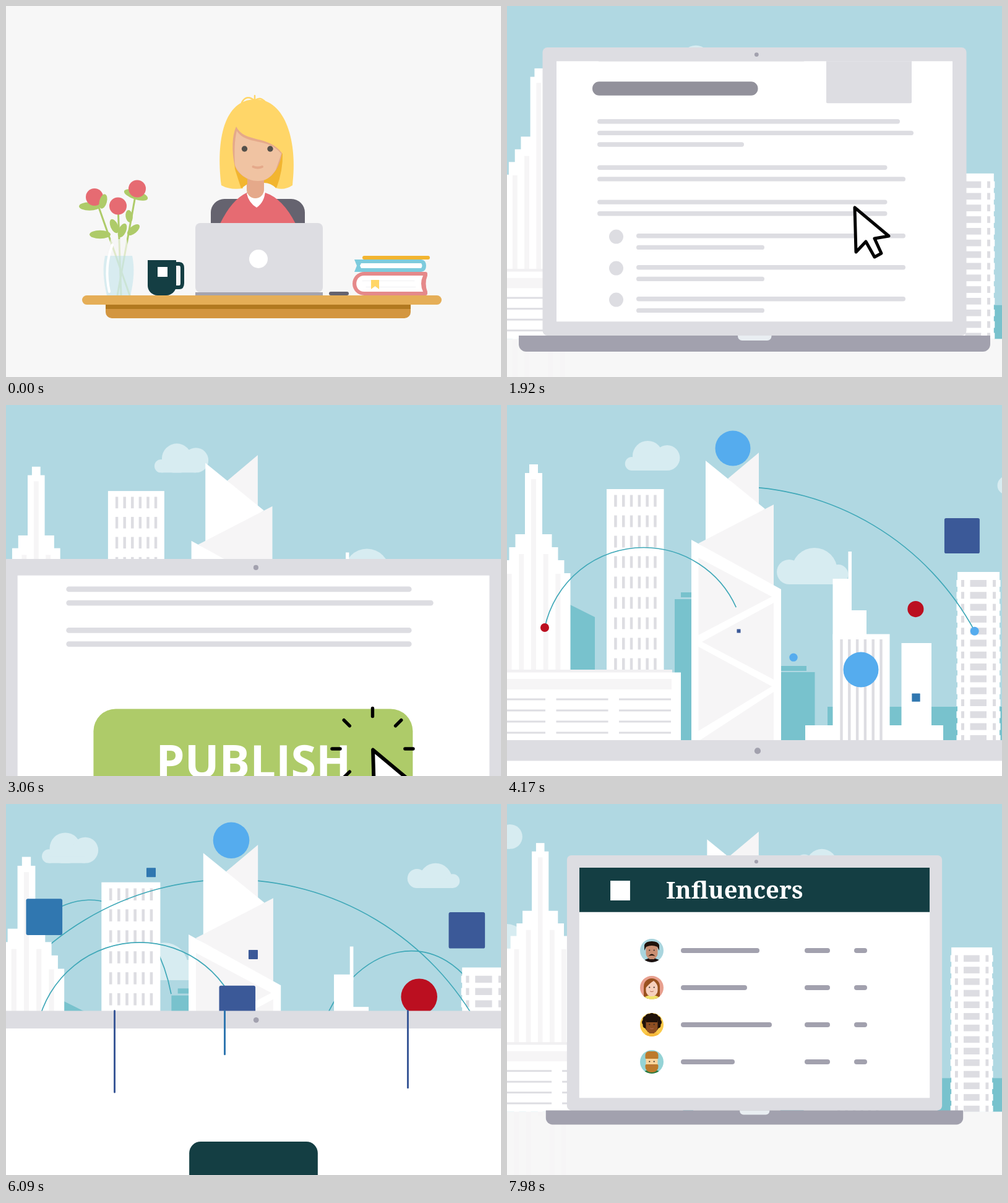
An HTML page with a canvas that plays this animation: 800x600 px, repeating every 8 s.

```html
<!DOCTYPE html>
<html lang="en">
<head>
<meta charset="utf-8">
<title>Publishing</title>
<style>
  html, body { margin: 0; width: 100%; height: 100%; overflow: hidden; background: #f7f7f7; }
  canvas { display: block; width: 100vw; height: 100vh; }
</style>
</head>
<body>
<canvas id="stage" width="800" height="600"></canvas>
<script>
const ctx = document.getElementById('stage').getContext('2d');
const LOOP = 8000;
const SKY = '#b0d8e2', CLOUD = '#d7ecf1', PAPER = '#f7f7f7', GREY = '#dddde2', SHADE = '#f6f5f6';
const TEAL = '#78c2cd', DARK = '#143e43', SLATE = '#a2a1ae', RED = '#e66b72', LEAF = '#aecb69';
const SKIN = '#f0c3a2', SKIN_SHADE = '#e5a98a', HAIR = '#ffd668', HAIR_SHADE = '#f2b530', EYE = '#54504a';
const NAVY = '#3b5998', BLUE = '#3077b0', AZURE = '#55acee', CRIMSON = '#bb0f20';

// ---- timing ----
const mix = (a, b, k) => a + (b - a) * k;
const prog = (t, a, b) => Math.min(1, Math.max(0, (t - a) / (b - a)));
const smooth = k => k * k * (3 - 2 * k);
const inOut = (k, n) => k < .5 ? (2 * k) ** n / 2 : 1 - (2 - 2 * k) ** n / 2;
const easeOut = k => 1 - (1 - k) ** 3;

// ---- drawing ----
function rect(x, y, w, h, color) { ctx.fillStyle = color; ctx.fillRect(x, y, w, h); }
function box(x1, y1, x2, y2, color) { rect(x1, y1, x2 - x1, y2 - y1, color); }
function round(x1, y1, x2, y2, r, color) {
  ctx.beginPath();
  ctx.roundRect(x1, y1, x2 - x1, y2 - y1, r);
  ctx.fillStyle = color;
  ctx.fill();
}
function oval(x, y, rx, ry, color, deg = 0) {
  ctx.beginPath();
  ctx.ellipse(x, y, rx, ry, deg * Math.PI / 180, 0, 7);
  ctx.fillStyle = color;
  ctx.fill();
}
const disc = (x, y, r, color) => oval(x, y, r, r, color);
function shape(d, color) { ctx.fillStyle = color; ctx.fill(new Path2D(d)); }
function line(d, color, width, cap = 'round') {
  ctx.strokeStyle = color;
  ctx.lineWidth = width;
  ctx.lineCap = cap;
  ctx.lineJoin = 'round';
  ctx.stroke(new Path2D(d));
}
function layer(draw) { ctx.save(); draw(); ctx.restore(); }
function clip(x, y, w, h) { ctx.beginPath(); ctx.rect(x, y, w, h); ctx.clip(); }
// scales about the point (x, y) and moves that point to (toX, toY)
function place(x, y, toX, toY, scale) {
  ctx.translate(toX, toY);
  ctx.scale(scale, scale);
  ctx.translate(-x, -y);
}
function text(str, x, y, font, align) {
  ctx.font = font;
  ctx.textAlign = align;
  ctx.fillStyle = '#fff';
  ctx.fillText(str, x, y);
}

// ---- desk ----
function flower(x, y, root) {
  line(`M${x + (root - x) * .1} ${y + 13}L${root} 468`, LEAF, 3, 'butt');
  disc(x, y, 14, RED);
}
const leaf = (x, y, length, deg) => oval(x, y, length, 4 + length / 6, LEAF, deg);

function flowers() {
  leaf(135, 324, 17, 0);
  leaf(152, 369.5, 17, 0);
  leaf(210, 305.5, 20, 18);
  leaf(199, 340, 10, 82);
  leaf(206, 362, 12, -40);
  for (const side of [-1, 1]) leaf(181.5 + 6.5 * side, 359.5 + 3.5 * side, 12, 90 + 24 * side);
  flower(143, 309, 200);
  flower(181, 323.5, 186);
  flower(212, 295.5, 180);
  leaf(157, 316, 12, 105);
  shape('M169 377H195Q198 395 204 404H160Q167 392 169 377Z', '#f7f7f7b0');
  shape('M160 404H204Q210 432 201 468H163Q154 432 160 404Z', '#d2eaf0d0');
  line('M172 386Q158 422 167 462', '#fff', 4);
}

function mug() {
  line('M270 417H280Q285 417 285 424V448Q285 455 280 455H270', DARK, 6);
  round(229, 411, 275, 468, [0, 0, 16, 16], DARK);
  rect(245, 422, 16, 16, '#fff');
}

function books() {
  round(576, 404, 685, 410, 3, HAIR_SHADE);
  shape('M563 410H671Q679 411 679 420Q679 429 671 430H563L567 420Z', '#7dcbdd');
  shape('M574 416H671Q674 420 671 424H574L572 420Z', '#fff');
  round(560, 430, 681, 468, [19, 3, 3, 19], '#e5898a');
  shape('M579 436H674Q668 449 674 462H579C562 462 562 436 579 436Z', '#fff');
  shape('M681 436Q676 449 681 462Z', PAPER);
  line('M576 444.5H660M582 454.5H662', '#f1f1f3', 1);
  shape('M590 443H603V458L596.5 453L590 458Z', HAIR);
}

function head() {
  round(389, 262, 417, 311, 14, SKIN_SHADE);
  shape('M348 290C339 215 353 152 402 151C452 150 472 220 463 290Q451 298 438 295L425 255H385L383 295Q362 298 348 290Z', HAIR);
  shape('M368 240L370 264L380 295L390 288V265ZM447 238Q448 265 437 295Q428 286 417 286V265Z', HAIR_SHADE);
  shape('M372 195C385 222 425 208 446 238C441 268 425 283 407 283C386 283 371 267 369 255C365 235 365 210 372 195Z', SKIN_SHADE);
  shape('M373 202C388 226 424 212 445 239L436 265C427 279 418 283 407 283C389 283 374 270 370 257C369 235 369 218 373 202Z', SKIN);
  line('M381 156Q389 142 402 153Q410 146 418 154M402 145V155', HAIR, 2.5);
  for (const x of [385.5, 427]) disc(x, 231, 4.7, EYE);
  line('M399.5 260Q407 263 414 260', SKIN_SHADE, 4);
}

function desk(t) {
  round(331, 312, 483, 380, 22, '#65636f');
  shape('M346 352Q365 313 389 302H419Q447 311 468 352Z', RED);
  shape('M389 303Q392 318 405 326Q418 317 419 299Z', '#fff');
  layer(() => {
    ctx.translate(403, 308);
    ctx.rotate(-.06 * Math.sin(Math.PI * prog(t, 30, 810)));
    ctx.translate(-403, -308);
    head();
  });
  round(306, 351, 512, 463, 8, GREY);
  box(306, 463, 512, 468, '#a5a4ae');
  disc(408, 409, 15, '#fff');
  flowers();
  mug();
  round(522, 462, 554, 468, 3, '#65636f');
  books();
  round(161, 483, 654, 505, [0, 0, 10, 10], '#d39640');
  box(161, 483, 654, 490, '#b27920');
  round(123, 468, 704, 483, 7.5, '#e5ae57');
}

// ---- city ----
function cloud(x, bottom, rise, left, main, right) {
  const from = x - .78 * main - .6 * left, to = x + .78 * main + .6 * right;
  layer(() => {
    clip(x - 150, 0, 300, bottom);
    disc(from, bottom - left, left, CLOUD);
    disc(x, bottom - rise, main, CLOUD);
    disc(to, bottom - right, right, CLOUD);
    box(from, bottom - Math.min(left, right), to, bottom, CLOUD);
  });
}

// Clouds speed up until 6.09 s, then drift evenly; nearer ones move faster.
function clouds(t) {
  const s = t / 1000 - 1.92, curved = Math.min(s, 4.17);
  const drift = 17 * curved + 7.36 * curved ** 2 + 75.5 * (s - curved);
  cloud(303 - drift, 106, 23.5, 11, 24.5, 20.5);
  cloud(642 - 1.92 * drift, 290, 22, 20, 37, 16);
  cloud(929 - 1.22 * drift, 145, 13, 15, 26, 11);
}

function leftTower() {
  const tier = (half, top) => box(43 - half, top, 43 + half, 430, '#fff');
  tier(7, 96);
  tier(14, 110);
  for (let i = 0; i < 4; i++) tier(29.5 + 10 * i, 209 + 21 * i);
  for (let i = -2; i <= 2; i++) rect(39 + 19.7 * i, i ? 209 + 32 * Math.abs(i) : 120, 8, 430, SHADE);
  box(-40, 428, 267, 433, '#f1f0f2');
  box(-40, 432.5, 281, 544, '#fff');
  box(-40, 443, 266, 460, SHADE);
  for (let y = 474.5; y < 540; y += 18)
    for (let x = -22; x < 200; x += 101.5) rect(x, y, 84, 3, GREY);
}

function windowBlock() {
  box(161, 136, 253.5, 432, '#fff');
  for (let y = 145.5; y < 420; y += 33)
    for (let i = 0; i < 6; i++) rect(173.2 + 12.8 * i, y, 4.5, 19, GREY);
}

function crystal() {
  shape('M357 119L407 77V170Z', SHADE);
  shape('M321 90L417 168L321 240Z', '#fff');
  shape('M309 224L431 161V300Z', SHADE);
  shape('M298 218L443 298V544H298Z', '#fff');
  shape('M309.5 247L428 310L309.5 372ZM431 320V444L315 383ZM309.5 391L428 455L309.5 527ZM431 464V544H309Z', SHADE);
}

function spireTower() {
  box(551.5, 237, 557, 290, '#fff');
  box(526.5, 281, 557, 380, '#fff');
  box(550, 332, 581, 380, '#fff');
  box(526.5, 370.5, 618.5, 544, '#fff');
  box(482, 518, 705, 544, '#fff');
  box(637.5, 385, 686, 544, '#fff');
  for (let i = 0; i < 6; i++) rect(538.3 + 12.8 * i, 379, 4.4, 165, GREY);
}

function rightTower() {
  box(728, 270, 796, 544, '#fff');
  for (let y = 283; y < 540; y += 19.3) {
    const h = Math.min(11, 544 - y);
    rect(726.5, y, 71, h, '#fff');
    rect(748.5, y, 26.5, h, GREY);
    for (const side of [-1, 1]) rect(759.5 + 25.5 * side, y, 5, h, GREY);
  }
}

function backBlocks() {
  shape('M102 323L142 343V432H102Z', TEAL);
  box(281, 303, 300, 311, TEAL);
  box(271, 314, 300, 544, TEAL);
  box(440, 422, 484, 430, TEAL);
  box(440, 432, 497.5, 544, TEAL);
  box(518, 488, 860, 544, TEAL);
  box(-100, 544, 900, 800, PAPER);
}

const fadeOut = t => 1 - smooth(prog(t, 6250, 6400));

function arc(t, d, length, start, end) {
  const k = prog(t, start, end) * fadeOut(t);
  if (!k) return;
  layer(() => {
    ctx.setLineDash([length * k, length * 2]);
    line(d, '#3fa8b8', 1.6, 'butt');
  });
}

// A badge grows while rising to its place.
function badge(t, start, color, x, y) {
  const grow = easeOut(prog(t, start, start + 330));
  const half = 28.5 * grow * fadeOut(t), cy = y + 48 * (1 - grow) ** 2;
  if (half < .3) return;
  if (color === AZURE || color === CRIMSON) disc(x, cy, half, color);
  else round(x - half, cy - half, x + half, cy + half, half * .1, color);
}

function badges(t) {
  const dot = 7 * prog(t, 3580, 3700) * fadeOut(t);
  disc(61, 360, dot, CRIMSON);
  disc(755.7, 365.7, dot, AZURE);
  badge(t, 3700, AZURE, 365, 70);
  badge(t, 3750, NAVY, 735.4, 211.5);
  badge(t, 3800, AZURE, 572, 428);
  badge(t, 4110, CRIMSON, 660.4, 316);
  badge(t, 4143, BLUE, 661, 445);
  badge(t, 4143, AZURE, 463, 380);
  badge(t, 4159, NAVY, 374.5, 327);
  badge(t, 4700, BLUE, 71, 190.5);
  badge(t, 6060, BLUE, 239, 94);
  badge(t, 6060, NAVY, 399.5, 223);
}

function city(t) {
  const zoom = .0146 * (Math.min(6360, Math.max(2580, t)) - 4170) / 1000;
  const drop = smooth(prog(t, 6360, 6850));
  const scale = mix(1 + zoom, .9825, drop) - .0125 * prog(t, 6850, 7980);
  const dy = mix(-380 * zoom - 3200 * zoom ** 2, -30, drop);
  rect(0, 0, 800, 600, SKY);
  layer(() => {
    place(400, 0, 400, dy, scale);
    clouds(t);
    backBlocks();
    arc(t, 'M70 190C170 120 250 200 271 314', 290, 4650, 5200);
    arc(t, 'M505 373C550 230 700 190 765 335', 380, 4750, 5350);
    windowBlock();
    rightTower();
    arc(t, 'M756 366A445 445 0 0 0 -28 366', 959, 3650, 4640);
    leftTower();
    crystal();
    spireTower();
    arc(t, 'M61 360A163.6 163.6 0 0 1 381 360', 445, 3650, 4215);
    badges(t);
  });
}

// ---- screen contents ----
const bar = (x1, x2, y) => round(x1, y - 3.7, x2, y + 3.7, 3.7, GREY);
const paragraph = (x, y, ...ends) => ends.forEach((end, i) => bar(x, end, y + 18.6 * i));

function article() {
  paragraph(146, 49.5, 482, 450, 482);
  round(516, 19, 654, 158, 2, GREY);
  round(138, 123, 405.5, 145.5, 11, '#92919b');
  paragraph(146, 187.5, 635, 657, 383);
  for (const y of [262, 529]) {
    paragraph(146, y, 614.5, 644);
    paragraph(146, y + 55.8, 614.5, 614.5);
  }
  for (let y = 372.5; y < 490; y += 51) {
    disc(176.5, y + 1.2, 11.5, GREY);
    paragraph(209, y, 644, 416);
  }
  round(183, 691.5, 616, 834, 30, LEAF);
  text('PUBLISH', 400, 785, 'bold 62px "Open Sans", "Noto Sans", sans-serif', 'center');
}

function pointer(t) {
  const outline = 'M562 326L564 398L580 381L594 406L605 400L594 376L617 372Z';
  shape(outline, '#fff');
  line(outline, '#000', 5);
  if (t < 2960 || t > 3240) return;
  const burst = easeOut(prog(t, 2960, 3060)), near = mix(32, 44, burst), far = mix(36, 55, burst);
  // rays all round, leaving a gap where the pointer's body is
  for (let i = 2; i <= 8; i++) {
    const c = Math.cos(i * Math.PI / 4), s = Math.sin(i * Math.PI / 4);
    line(`M${561.5 + c * near} ${324.5 + s * near}L${561.5 + c * far} ${324.5 + s * far}`, '#000', 4.5);
  }
}

function page(t) {
  layer(() => {
    ctx.translate(0, -mix(-130, 421, inOut(prog(t, 1640, 2456), 2)));
    article();
  });
  pointer(t);
}

const PEOPLE = [
  { back: '#a9d5de', hair: '#20120a', skin: '#c98f72', top: '#1d1210', width: 127 },
  { back: '#e8a08f', hair: '#99511f', skin: '#f6d0bd', top: '#f1e26b', width: 107 },
  { back: '#fbca4a', hair: '#20120a', skin: '#8e4f22', top: '#f6b93b', width: 147 },
  { back: '#94d3d6', hair: '#bd7a2b', skin: '#f9d49c', top: '#2b7a3f', width: 87 }
];
const HAIR_BEHIND = [
  () => {},
  hair => round(-13, -15, 13, 18, [13, 13, 4, 4], hair),
  hair => {
    for (let a = 0; a < 6.2; a += Math.PI / 6) disc(11 * Math.cos(a), -4 + 10 * Math.sin(a), 5, hair);
  },
  () => {}
];
const HAIR_FRONT = [
  hair => shape('M-12 0V-9Q-10 -15 0 -15Q10 -15 12 -9V0L9 -6Q0 -10 -9 -6ZM-5.5 9Q0 2 5.5 9Q0 7 -5.5 9Z', hair),
  hair => shape('M-11 2Q-11 -14 2 -14Q11 -13 11 2Q8 -8 3 -11Q-4 -7 -11 2Z', hair),
  hair => box(-9, -11, 9, -4, hair),
  hair => {
    round(-10.5, -17, 10.5, -5, [6, 6, 1, 1], hair);
    round(-10.5, 4, 10.5, 17, [2, 2, 9, 9], hair);
  }
];

function person({ back, hair, skin, top }, i) {
  ctx.beginPath();
  ctx.arc(0, 0, 19, 0, 7);
  ctx.clip();
  rect(-19, -19, 38, 38, back);
  HAIR_BEHIND[i](hair);
  oval(0, 21, 15, 9, top);
  box(-4, 6, 4, 14, skin);
  round(-9.5, -11, 9.5, 14, [6, 6, 9, 9], skin);
  HAIR_FRONT[i](hair);
  for (const x of [-3.7, 3.7]) disc(x, -.5, 1.1, '#332a26');
  if (i) line('M-2.5 6Q0 7.5 2.5 6', '#b76b55', 1);
}

function row(who, i) {
  const y = 237 + 60 * i, pill = (x, w) => round(x, y - 4, x + w, y + 4, 4, SLATE);
  layer(() => {
    ctx.translate(234, y);
    person(who, i);
  });
  pill(281, who.width);
  pill(481, 41);
  pill(561, 21);
}

function panel(t) {
  const grow = smooth(prog(t, 5915, 6235)), open = smooth(prog(t, 7020, 7380));
  if (!grow) return;
  const w = mix(282 * grow, 640, open), h = mix(142 * grow, 81.4, open);
  const x = 400 - w / 2, y = mix(mix(282, 266, grow), 130, open) - h / 2;
  round(x, y, x + w, y + h, Math.min(14.5 * (1 - open), h / 2), DARK);
  const size = mix(51, 36, open) * smooth(prog(t, 6300, 6500));
  rect(mix(337.8, 154.8, open) - size / 2, mix(264.8, 131.4, open) - size / 2, size, size, '#fff');

  place(400, 83, 400, 67, 1 / .885);
  ctx.globalAlpha = prog(t, 7330, 7480);
  text('Influencers', 257, 153, 'bold 38.2px "Noto Serif", serif', 'left');
  PEOPLE.forEach((who, i) => {
    ctx.globalAlpha = prog(t, 7400 + 90 * i, 7520 + 90 * i);
    row(who, i);
  });
}

function stream(t, x, top, start, color) {
  const reach = (t - start) * .9, tail = Math.max(0, reach - 140);
  if (reach > 0 && tail < 130) line(`M${x} ${top + tail}V${top + Math.min(reach, 200)}`, color, 3);
}

function laptop(t) {
  const raise = inOut(prog(t, 2540, 3730), 2) - inOut(prog(t, 5852, 6352), 3);
  const settle = prog(t, 6350, 7090);
  const scale = 1 + .5 * raise - .115 * settle, top = 67 + 475 * raise + 16 * settle;
  layer(() => {
    place(400, 67, 400, top, scale);
    round(57.5, 67, 742.5, 533, 8, GREY);
    round(19, 533, 781, 559, [0, 0, 12, 12], SLATE);
    round(373, 533, 427.5, 541, [0, 0, 7, 7], '#e9eef2');
    disc(403.3, 78.6, 3.4, SLATE);
    rect(80, 89.3, 640, 421, '#fff');
    clip(80, 89.3, 640, 421);
    if (t < 3900) page(t);
    else panel(t);
  });
  stream(t, 175.5, top, 5945, NAVY);
  stream(t, 353.5, top, 6013, BLUE);
  stream(t, 649.5, top, 5953, NAVY);
}

function draw(t) {
  rect(0, 0, 800, 600, PAPER);
  if (t < 1530) desk(t);
  else {
    city(t);
    laptop(t);
  }
}

const begin = performance.now();
function tick(now) {
  draw(Math.max(0, now - begin) % LOOP);
  requestAnimationFrame(tick);
}
draw(0);
requestAnimationFrame(tick);
</script>
</body>
</html>
```
